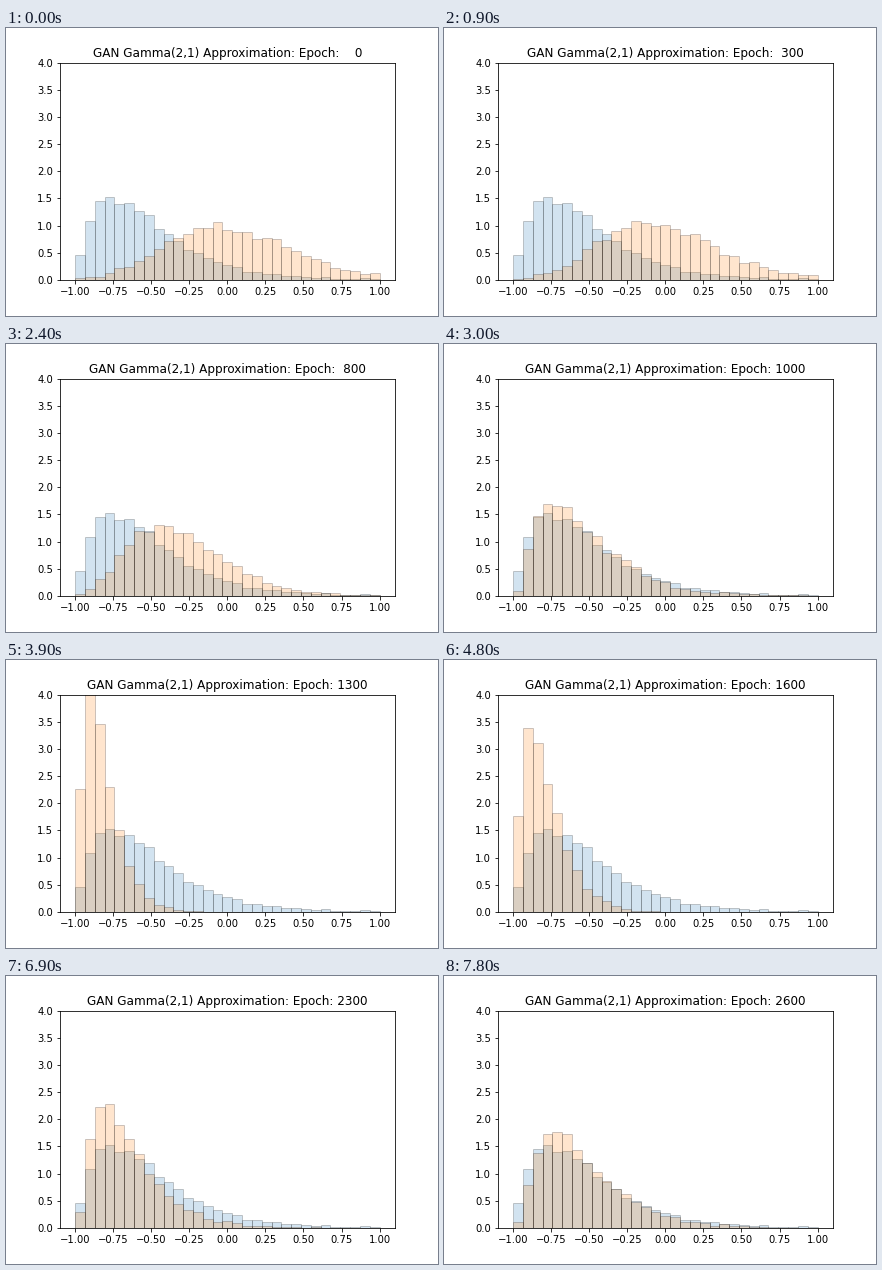
These frames come from a looping animation (432x288 px, 8 s). A matplotlib script:

```python
import numpy as np
import matplotlib.pyplot as plt
from matplotlib.animation import FuncAnimation

EDGES = np.linspace(-1, 1, 32)
WIDTH = EDGES[1] - EDGES[0]
SAMPLES = 5000

# Mean, spread and gamma shape of the distributions.
REAL = (-0.51, 0.346, 2)
GENERATED = {
    0: (0.03, 0.42, 20),
    600: (-0.07, 0.36, 9),
    1000: (-0.524, 0.308, 2),
    1300: (-0.82, 0.122, 2),
    1900: (-0.75, 0.177, 2),
    2300: (-0.64, 0.233, 2),
    2600: (-0.533, 0.288, 2.3),
}


def gamma_histogram(mean, spread, shape, seed):
    """Bar heights of seeded gamma samples with the given mean and spread."""
    scale = spread / np.sqrt(shape)
    draws = np.random.default_rng(seed).gamma(shape, scale, SAMPLES)
    return np.histogram(draws + mean - shape * scale, EDGES, density=True)[0]


def generated_heights(epoch):
    params = [np.interp(epoch, list(GENERATED), values)
              for values in zip(*GENERATED.values())]
    return gamma_histogram(*params, seed=epoch)


def draw_bars(heights, color):
    return ax.bar(EDGES[:-1], heights, WIDTH, align="edge",
                  color=color, edgecolor="black", alpha=0.2)


fig, ax = plt.subplots(figsize=(6, 4), dpi=72)
fig.subplots_adjust(left=0.125, right=0.9, bottom=0.125, top=0.88)

draw_bars(gamma_histogram(*REAL, seed=7), "tab:blue")
bars = draw_bars(generated_heights(0), "tab:orange")
ax.set_xlim(-1.1, 1.1)
ax.set_ylim(0, 4)
ax.set_xticks(np.linspace(-1, 1, 9))
ax.set_yticks(np.arange(0, 4.1, 0.5))
title = ax.set_title("")


def update(frame):
    epoch = frame // 3 * 100
    for bar, height in zip(bars, generated_heights(epoch)):
        bar.set_height(height)
    title.set_text(f"GAN Gamma(2,1) Approximation: Epoch: {epoch:4d}")
    return [*bars, title]


anim = FuncAnimation(fig, update, frames=80, interval=100, repeat=True)
plt.show()
```
